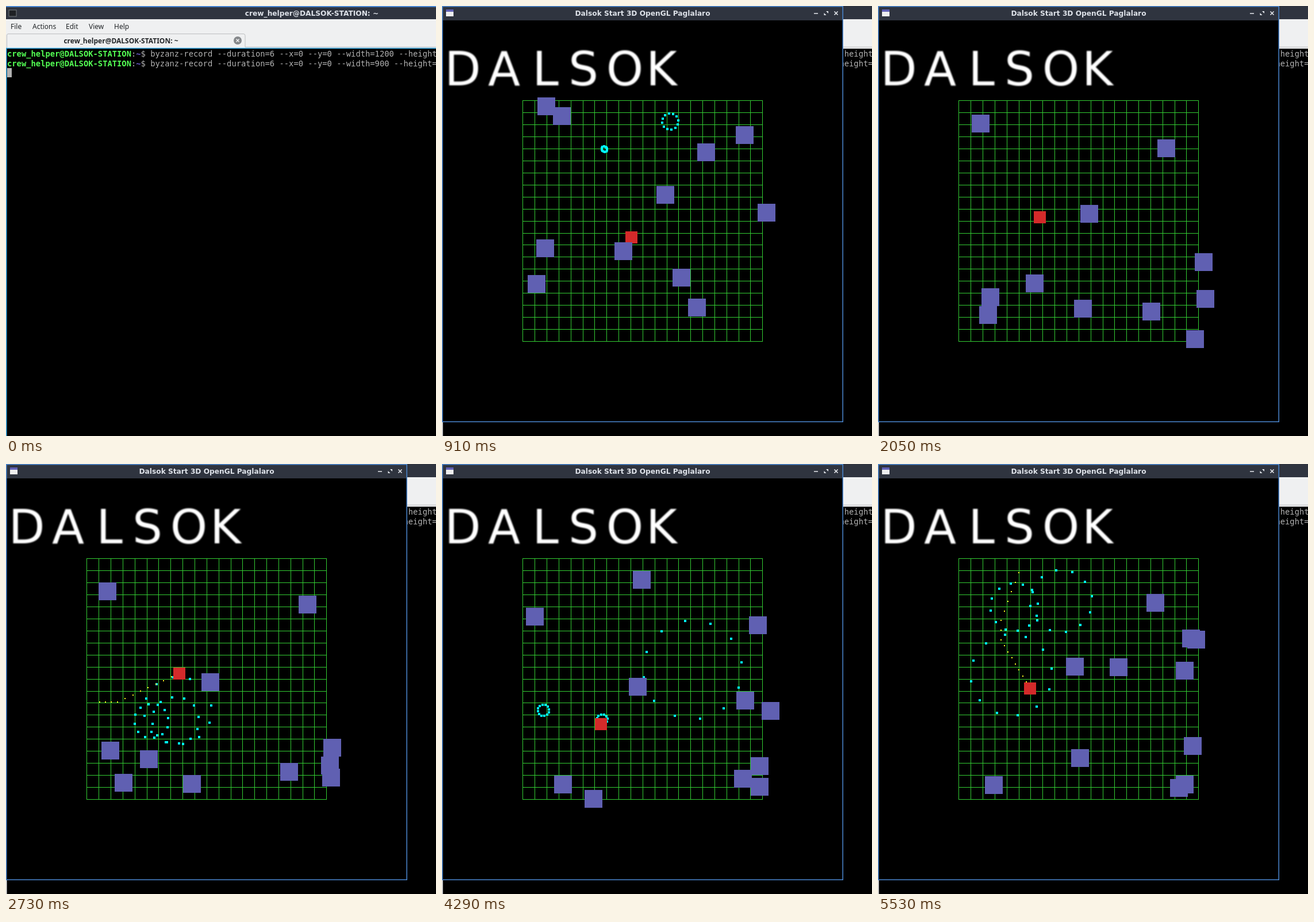
An HTML page with a canvas that plays this animation: 748x748 px, repeating every 5550 ms.

```html
<!DOCTYPE html>
<html lang="en">
<head>
<meta charset="utf-8">
<title>Start 3D OpenGL</title>
<style>
  html, body { margin: 0; width: 100%; height: 100%; overflow: hidden; background: #000; }
  svg, canvas { position: absolute; left: 0; top: 0; width: 748px; height: 748px; }
  text { white-space: pre; }
  .title { font: bold 12.2px "DejaVu Sans", sans-serif; fill: #dde1e8; text-anchor: middle; }
  .menu { font: 12px "Noto Sans", sans-serif; fill: #232629; }
  .tab { font: bold 12px "Noto Sans", sans-serif; fill: #232629; text-anchor: middle; }
  .term { font: 13.8px "DejaVu Sans Mono", monospace; fill: #b2b2b2; }
  .user { font-weight: bold; fill: #54ff54; }
  .path { font-weight: bold; fill: #6a5acd; }
  .sign { font: 82px "DejaVu Sans", sans-serif; fill: #fff; text-anchor: middle; filter: blur(1.2px); }
</style>
</head>
<body>
<svg viewBox="0 0 748 748">
  <rect width="748" height="748"/>
  <rect width="748" height="23" fill="#2f343f"/>
  <rect id="topEdge" width="748" height="2" fill="#4a86cf"/>
  <rect x="5" y="7" width="13" height="11" fill="#1d2024" stroke="#777c80"/>
  <text class="title" x="532" y="17">crew_helper@DALSOK-STATION: ~</text>
  <rect y="23" width="748" height="51" fill="#eff0f1"/>
  <g class="menu">
    <text x="8" y="40">File</text>
    <text x="46" y="40">Actions</text>
    <text x="104" y="40">Edit</text>
    <text x="144" y="40">View</text>
    <text x="188" y="40">Help</text>
  </g>
  <path d="M1.5 73V51q0-2.5 2.5-2.5H413q3 0 3 3V71.5H748" fill="none" stroke="#bcbec0"/>
  <text class="tab" x="200" y="65">crew_helper@DALSOK-STATION: ~</text>
  <circle cx="403" cy="60" r="7" fill="#85888b"/>
  <path d="M400.5 57.5l5 5m0-5l-5 5" stroke="#fff" stroke-width="1.2"/>
  <path id="focus" d="M0 73.5H748M.75 73V748" fill="none" stroke="#3daee9" stroke-width="1.5"/>
  <g class="term">
    <text x="2" y="88"><tspan class="user">crew_helper@DALSOK-STATION</tspan>:<tspan class="path">~</tspan>$ byzanz-record --duration=6 --x=0 --y=0 --width=1200 --height=900</text>
    <text x="2" y="104.5"><tspan class="user">crew_helper@DALSOK-STATION</tspan>:<tspan class="path">~</tspan>$ byzanz-record --duration=6 --x=0 --y=0 --width=900 --height=900</text>
  </g>
  <rect x="2" y="108" width="8" height="16" fill="#b2b2b2"/>

  <g id="game" visibility="hidden">
    <rect width="698" height="724"/>
    <rect width="698" height="25" fill="#2f343f"/>
    <rect x=".75" y=".75" width="696.5" height="722.5" fill="none" stroke="#4a86cf" stroke-width="1.5"/>
    <rect x="7" y="6" width="13" height="12" fill="#eee"/>
    <rect x="7" y="6" width="13" height="4" fill="#6060b4"/>
    <text class="title" x="349" y="17">Dalsok Start 3D OpenGL Paglalaro</text>
    <path d="M647 13h7M682.5 9.500l6 6m0-6l-6 6" stroke="#e6e9ee" stroke-width="1.6"/>
    <path d="M668 9h4v4zM664.5 12v4h4z" fill="#e6e9ee"/>
    <g class="sign">
      <text x="36" y="138">D</text>
      <text x="108" y="138">A</text>
      <text x="180" y="138">L</text>
      <text x="246" y="138">S</text>
      <text x="318" y="138">O</text>
      <text x="382" y="138">K</text>
    </g>
  </g>
</svg>
<canvas id="field" width="748" height="748"></canvas>
<script>
const LOOP = 5550, OPEN = 80, STEP = 65.7, TICK = 1000 / 60;
const W = 416, H = 418, LEFT = 141, TOP = 164, BLOCK_TOP = 155;
const SHOT_SPEED = 10.4, BLAST_SPEED = 0.125, BLAST_LIFE = 700, BLAST_TURN = -9;
const UP = [0, -1], LEFTWARD = [-1, 0], RIGHTWARD = [1, 0], HOLD = null;

const $ = id => document.getElementById(id);
const ctx = $('field').getContext('2d');
const wrap = (v, low, size) => low + (((v - low) % size) + size) % size;
const nearest = (d, size) => d - size * Math.round(d / size);

// Player: time, centre, and where it fires until the next point.
const route = [
  [600, 363.5, 490, HOLD],
  [1240, 283, 282, UP], [1327, 314, 301, UP], [1394, 289, 302, HOLD],
  [2520, 277, 414, LEFTWARD], [2575, 277, 414, LEFTWARD], [2708, 301, 364, HOLD],
  [3342, 377, 283, RIGHTWARD], [3530, 290, 351, RIGHTWARD], [3628, 213.5, 390, HOLD],
  [4670, 313.5, 489, LEFTWARD], [4743, 313.5, 515, LEFTWARD], [4809, 313.5, 515, LEFTWARD],
  [4876, 313.5, 490, HOLD],
  [5280, 246, 344, UP], [5366, 214, 376, UP], [5400, 214, 389, UP], [5533, 264, 390, HOLD]
];

// Blocks drift across the wrapping field through three corner points each.
const moments = [1394, 3628, 5533];
const blocks = [
  [[165, 172], [159, 229], [538, 290]],
  [[463, 236], [542, 224], [518, 344]],
  [[522, 181], [154, 481], [529, 288]],
  [[550, 382], [553, 545], [508, 548]],
  [[364, 328], [324, 390], [327, 337]],
  [[281, 436], [199, 541], [186, 543]],
  [[374, 481], [261, 165], [467, 226]],
  [[442, 512], [502, 526], [518, 542]],
  [[185, 562], [153, 427], [403, 338]],
  [[171, 444], [201, 187], [336, 496]],
  [[144, 480], [540, 529], [532, 475]]
];

// Blasts: start time and centre.
const blasts = [
  [754, 397, 201], [830, 282.5, 249], [962, 295.5, 168],
  [2236, 299, 429], [2380, 295, 446], [2472, 253, 447],
  [3092, 199, 238.5], [3296, 343.5, 341.5], [3328, 398, 329], [3560, 312, 393], [3596, 436, 358],
  [4204, 176.5, 428.5], [4208, 278.5, 445], [4540, 298.5, 515], [4572, 266, 508],
  [4969, 232, 367], [5101, 318.5, 238.5], [5201, 237, 249]
];

function playerAt(t) {
  const next = route.findIndex(p => p[0] > t);
  const b = route.at(next), a = next > 0 ? route[next - 1] : b;
  const k = a === b ? 0 : (t - a[0]) / (b[0] - a[0]);
  return { x: a[1] + (b[1] - a[1]) * k, y: a[2] + (b[2] - a[2]) * k, aim: a[3] };
}

function square(x, y, size) {
  ctx.fillRect(Math.round(x - size / 2), Math.round(y - size / 2), size, size);
}

function drawGrid() {
  ctx.fillStyle = '#33cc33';
  for (let i = 0; i <= 20; i++) {
    ctx.fillRect(Math.round(140.32 + i * 20.85), 164, 1, 420);
    ctx.fillRect(140, Math.round(164.2 + i * 20.94), 418, 1);
  }
}

function drawBlasts(t) {
  ctx.fillStyle = '#00ffff';
  for (const [born, x, y] of blasts) {
    const age = t - born, r = age * BLAST_SPEED;
    if (age < 0 || age > BLAST_LIFE) continue;
    for (let i = 0; i < 12; i++) {
      const a = (BLAST_TURN + i * 30) * Math.PI / 180;
      square(wrap(x + r * Math.cos(a), LEFT, W), wrap(y + r * Math.sin(a), TOP, H), 4);
    }
  }
}

// One shot leaves the player on every game tick and flies straight on.
function drawShots(t) {
  ctx.fillStyle = '#ffff20';
  for (let age = 1; age <= 40; age++) {
    const { x, y, aim } = playerAt(t - age * TICK);
    if (!aim) continue;
    const sx = x + aim[0] * age * SHOT_SPEED, sy = y + aim[1] * age * SHOT_SPEED;
    if (sx > LEFT && sx < LEFT + W && sy > TOP && sy < TOP + H) square(sx, sy, 2);
  }
}

function drawBlocks(t) {
  ctx.fillStyle = '#6060b2';
  const i = t < moments[1] ? 0 : 1;
  const k = (t - moments[i]) / (moments[i + 1] - moments[i]);
  for (const path of blocks) {
    const [p, q] = path.slice(i);
    const x = wrap(p[0] + nearest(q[0] - p[0], W) * k, LEFT, W);
    const y = wrap(p[1] + nearest(q[1] - p[1], H) * k, BLOCK_TOP, H);
    ctx.fillRect(Math.round(x), Math.round(y), 31, 31);
  }
}

function draw(t, open) {
  $('game').setAttribute('visibility', open ? 'visible' : 'hidden');
  $('focus').setAttribute('stroke', open ? '#eff0f1' : '#3daee9');
  $('topEdge').setAttribute('fill', open ? '#2f343f' : '#4a86cf');
  ctx.clearRect(0, 0, 748, 748);
  if (!open) return;
  drawGrid();
  drawBlasts(t);
  drawShots(t);
  const { x, y } = playerAt(t);
  ctx.fillStyle = '#d42a2a';
  square(x, y, 21);
  drawBlocks(t);
}

const start = performance.now();
function tick() {
  const now = (performance.now() - start) % LOOP;
  const step = Math.floor((now - OPEN) / STEP + 0.25);
  draw(OPEN + step * STEP, now >= OPEN);
  requestAnimationFrame(tick);
}
tick();
</script>
</body>
</html>
```
